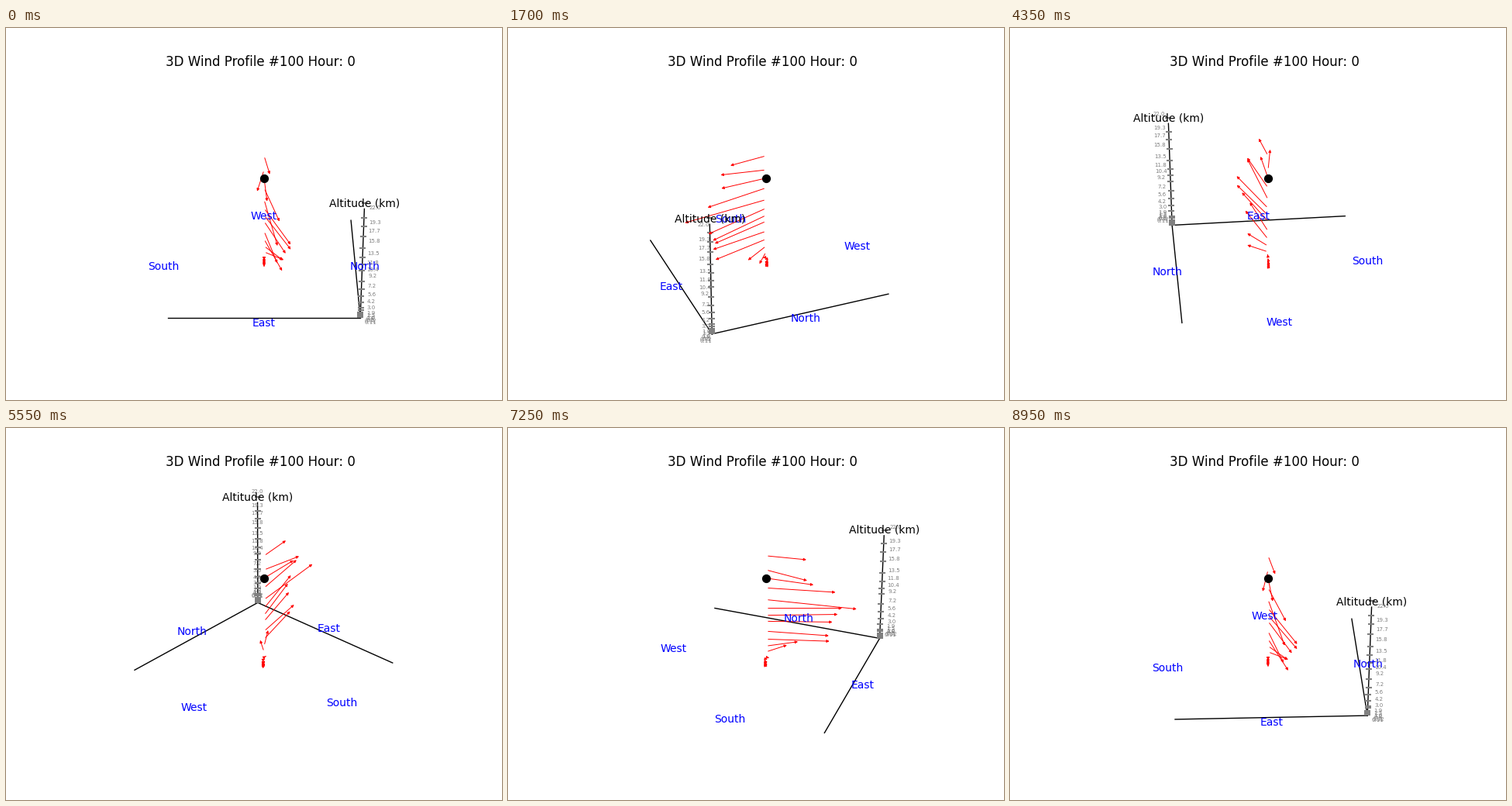
A matplotlib script that plays this animation: 640 by 480 pixels, repeating every 9000 ms.

```python
import numpy as np
import matplotlib.pyplot as plt
from matplotlib.animation import FuncAnimation
from matplotlib.patches import FancyArrowPatch

W, H, DPI = 640, 480, 100
FRAMES, STEP_MS = 180, 50
CX, CY, FOCAL, DIST = 333.0, 237.4, 1997.8, 10.0
ELEV = np.radians(30)
EDGE = 0.602                      # distance of the axis corner
RIM = 1.1 * EDGE                  # distance of the labels
Z_SCALE, Z_MID, Z_TOP = 0.0375, 11.055, 20.9
BALLOON_KM = 17.7

# Heights (km) of the pressure levels, also the tick labels
LEVELS = np.array([0.11, 0.32, 0.5, 0.8, 1.0, 1.5, 1.9, 3.0, 4.2, 5.6,
                   7.2, 9.2, 10.4, 11.8, 13.5, 15.8, 17.7, 19.3, 22.0])


def wind(km):
    """Eastward and northward wind, interpolated between a few heights."""
    east = np.interp(km, [1.5, 4.2, 5.6, 9.2, 11.8, 13.5, 17.7, 22],
                     [0.01, 0.19, 0.41, 0.42, 0.473, 0.596, 0.326, 0.27])
    north = np.interp(km, [1.9, 3, 5.6, 7.2, 10.4, 11.8, 13.5, 15.8, 19.3, 22],
                      [0, 0.14, 0.12, 0.088, 0.174, 0.172, 0.085, 0.1,
                       -0.047, 0.039])
    return east, north


def project(x, y, km, azim):
    """Perspective view of a point, in stage pixels."""
    z = (km - Z_MID) * Z_SCALE
    right = -x * np.sin(azim) + y * np.cos(azim)
    near = x * np.cos(azim) + y * np.sin(azim)
    up = z * np.cos(ELEV) - near * np.sin(ELEV)
    k = FOCAL / (DIST - near * np.cos(ELEV) - z * np.sin(ELEV))
    return CX + right * k, CY - up * k


fig = plt.figure(figsize=(W / DPI, H / DPI), dpi=DPI, facecolor="white")
ax = fig.add_axes([0, 0, 1, 1])
ax.set(xlim=(0, W), ylim=(H, 0))
ax.axis("off")

ax.text(328, 49.3, "3D Wind Profile #100 Hour: 0", fontsize=12, ha="center")

axis_ends = [(-EDGE, EDGE, 0), (EDGE, -EDGE, 0), (EDGE, EDGE, Z_TOP)]
axis_lines = [ax.plot([], [], color="black", lw=1, zorder=2)[0]
              for _ in axis_ends]
ticks, = ax.plot([], [], "_", color="gray", ms=6, mew=1.5, zorder=3)

labels = []


def add_label(text, pos, **style):
    item = ax.text(0, 0, text, ha="center", zorder=5, **style)
    labels.append((item, pos))


for name, x, y in [("East", 1, 0), ("West", -1, 0),
                   ("North", 0, 1), ("South", 0, -1)]:
    add_label(name, (x * RIM, y * RIM, 0), color="blue", va="center")
for km in LEVELS:
    add_label(str(km), (RIM, RIM, km), color="gray", fontsize=5, va="center")
add_label("Altitude (km)", (EDGE, EDGE, Z_TOP), color="black", va="bottom")

arrows = []
for _ in LEVELS:
    arrow = FancyArrowPatch((0, 0), (1, 1), arrowstyle="-|>", color="red",
                            mutation_scale=5, lw=0.7, zorder=4)
    ax.add_patch(arrow)
    arrows.append(arrow)

ax.scatter(*project(0, 0, BALLOON_KM, 0), s=50, color="black", zorder=4.5)


def update(i):
    azim = 2 * np.pi * i / FRAMES
    corner = project(EDGE, EDGE, 0, azim)
    for line, end in zip(axis_lines, axis_ends):
        line.set_data(*zip(corner, project(*end, azim)))
    ticks.set_data(*project(EDGE, EDGE, LEVELS, azim))
    for item, pos in labels:
        item.set_position(project(*pos, azim))
    for arrow, km in zip(arrows, LEVELS):
        arrow.set_positions(project(0, 0, km, azim),
                            project(*wind(km), km, azim))
    return []


anim = FuncAnimation(fig, update, frames=FRAMES, interval=STEP_MS,
                     repeat=True, repeat_delay=0)
plt.show()
```
